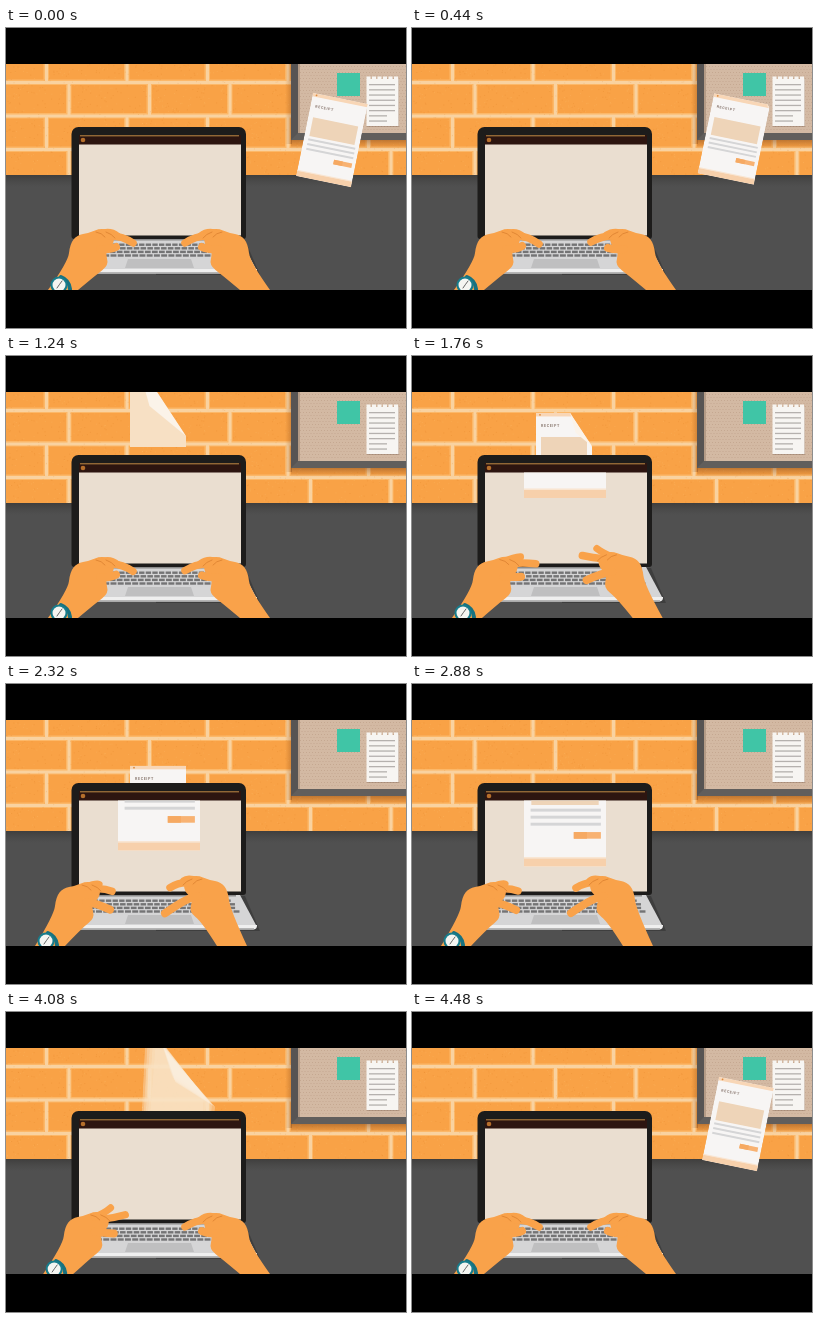
Animation, 400 px wide and 300 px high, one loop 4520 ms. Source, as an HTML page with a canvas:

```html
<!DOCTYPE html>
<html lang="en">
<head>
<meta charset="utf-8">
<title>Receipt to laptop</title>
<style>
html, body { margin: 0; width: 100%; height: 100%; overflow: hidden; background: #000; }
canvas { display: block; width: 400px; height: 300px; }
</style>
</head>
<body>
<canvas id="stage" width="400" height="300"></canvas>
<script>
const LOOP = 4520;
const PAPER_W = 56, PAPER_H = 85;
const MIRROR = 306;
const SKIN = '#f9a24a', CREASE = '#de8433';
const ctx = document.getElementById('stage').getContext('2d');

const REST = { arm: 57, palm: [86, 222], index: [127, 215], thumb: [110, 219] };
const LEFT_TYPE = { arm: 44, palm: [72, 219], index: [106, 207], thumb: [104, 226] };
const RIGHT_TYPE = { arm: 80, palm: [106, 213], index: [142, 204], thumb: [147, 229] };

const clamp = v => Math.min(1, Math.max(0, v));
const lerp = (a, b, u) => a + (b - a) * u;
const mix = (a, b, u) => [lerp(a[0], b[0], u), lerp(a[1], b[1], u)];

function ease(t, from, to) {
  const u = clamp((t - from) / (to - from));
  return u * u * (3 - 2 * u);
}

function random(seed) {
  return () => (seed = seed * 16807 % 2147483647) / 2147483647;
}

function box(c, x, y, w, h, fill) {
  c.fillStyle = fill;
  c.fillRect(x, y, w, h);
}

function roundBox(c, x, y, w, h, r, fill) {
  c.fillStyle = fill;
  c.beginPath();
  c.roundRect(x, y, w, h, r);
  c.fill();
}

function poly(c, fill, ...pts) {
  c.fillStyle = fill;
  c.beginPath();
  pts.forEach(p => c.lineTo(...p));
  c.closePath();
  c.fill();
}

function disc(c, x, y, r, fill) {
  c.fillStyle = fill;
  c.beginPath();
  c.arc(x, y, r, 0, 7);
  c.fill();
}

function line(color, width, a, bend, b) {
  ctx.strokeStyle = color;
  ctx.lineWidth = width;
  ctx.beginPath();
  ctx.moveTo(...a);
  ctx.quadraticCurveTo(...bend, ...b);
  ctx.stroke();
}

function fade(c, x0, y0, x1, y1, from, to) {
  const g = c.createLinearGradient(x0, y0, x1, y1);
  g.addColorStop(0, from);
  g.addColorStop(1, to);
  return g;
}

function layer(paint) {
  const el = document.createElement('canvas');
  el.width = 400;
  el.height = 300;
  paint(el.getContext('2d'));
  return el;
}

function paintWall(c) {
  const pitch = 80.5, rowStep = 33.5;
  box(c, 0, 36, 400, 111, '#f9d2a0');
  for (let row = 0; row < 4; row++) {
    const top = 22.5 + row * rowStep, h = rowStep - 3;
    const shift = row % 2 ? 63 : 40.5;
    for (let x = shift - pitch; x < 400; x += pitch) {
      box(c, x + 1.5, top, pitch - 3, h, '#fcb869');
      box(c, x + 2.5, top + 1, pitch - 5.5, h - 2.5, '#f9a246');
    }
  }
  const rnd = random(71);
  for (let i = 0; i < 1400; i++) {
    const fill = rnd() > .5 ? 'rgba(255,205,130,.2)' : 'rgba(205,105,20,.14)';
    box(c, rnd() * 400, 36 + rnd() * 110, 1, 1, fill);
  }
  box(c, 0, 0, 400, 36, '#000');
}

function paintBoard(c) {
  box(c, 279, 36, 7, 80, fade(c, 279, 0, 286, 0, 'rgba(150,80,20,0)', 'rgba(120,65,25,.35)'));
  box(c, 285, 112, 115, 9, fade(c, 0, 112, 0, 121, 'rgba(120,65,25,.45)', 'rgba(150,80,20,0)'));
  box(c, 285, 36, 115, 76, '#575453');
  poly(c, '#615e5c', [285, 112], [292, 105], [400, 105], [400, 112]);
  box(c, 292, 36, 108, 69, '#d3b9a3');
  for (let y = 38; y < 104; y += 3) {
    for (let x = 294 + y % 2 * 1.5; x < 400; x += 3) box(c, x, y, 1, 1, 'rgba(160,125,100,.28)');
  }
  box(c, 292, 36, 2, 69, 'rgba(90,65,50,.25)');
  box(c, 331, 45, 23, 23, '#40c5a6');
  box(c, 361, 51, 32, 48, 'rgba(80,55,40,.25)');
  box(c, 360.5, 51, 32, 47, '#f7f5f2');
  for (let x = 360.5; x < 392; x += 5.5) box(c, x, 48.5, 4, 3, '#f7f5f2');
  for (let y = 56; y < 93; y += 5.2) box(c, 363, y, y > 86 ? 18 : 26, 1.3, '#b5b1ae');
}

function paintDesk(c) {
  box(c, 0, 147, 400, 115, '#505050');
  box(c, 0, 147, 400, 12, fade(c, 0, 147, 0, 159, '#3f3e3d', 'rgba(70,70,70,0)'));
  box(c, 0, 262, 400, 38, '#000');
}

function paintLaptop(c) {
  poly(c, 'rgba(25,25,25,.3)', [150, 212], [239, 212], [254, 247], [150, 247]);
  roundBox(c, 65.5, 99, 174.5, 112, [7, 7, 3, 3], '#1d1c1b');
  box(c, 73, 107, 162, 100.5, '#eaded0');
  box(c, 73, 107, 162, 9.5, '#2d1510');
  box(c, 74, 107.3, 159, 1, '#bd8b47');
  disc(c, 77, 112, 2.3, '#b56f2c');

  poly(c, '#d5d5d6', [72, 211], [234, 211], [250, 241], [58, 241]);
  box(c, 76, 211, 154, 1.5, '#8b8b8b');
  roundBox(c, 57, 241, 194, 4.5, [0, 0, 4, 4], '#efefef');
  box(c, 60, 244, 188, 1.5, '#b5b5b5');
  for (let row = 0; row < 4; row++) {
    const y = 215.5 + row * 3.6, half = 73 + row * 2.2, step = half * 2 / 22;
    for (let i = 0; i < 22; i++) {
      box(c, 153 - half + (i + row % 2 * .3) * step, y, step - 1.3, 2.4, '#747475');
    }
  }
  poly(c, '#bfbfc0', [122, 231], [185, 231], [188, 240], [119, 240]);
}

const backdrop = layer(c => [paintWall, paintBoard, paintDesk].forEach(paint => paint(c)));
const laptop = layer(paintLaptop);

function receipt() {
  box(ctx, 0, 0, PAPER_W, PAPER_H, '#f7f5f4');
  box(ctx, 0, 0, PAPER_W, 3.5, '#f8d6b6');
  disc(ctx, 4, 1.8, .9, '#dc8a3e');
  ctx.fillStyle = '#8b7a72';
  ctx.font = 'bold 3.7px Roboto, Arial, sans-serif';
  ctx.letterSpacing = '.6px';
  ctx.fillText('RECEIPT', 5, 14);
  box(ctx, 5, 24, 46, 19, '#eed4b8');
  for (let y = 45.5; y < 57; y += 4.8) box(ctx, 4.5, y, 48, 2, '#d5d5d6');
  box(ctx, 34, 61.5, 18.5, 4.5, '#f8b272');
  box(ctx, 34, 61.5, 9, 4.5, '#f6a962');
  box(ctx, 0, 78.5, PAPER_W, 1, '#f9e6d3');
  box(ctx, 0, 79.5, PAPER_W, 5.5, '#f7d0ab');
}

// Lower edge of the receipt while it slides through the laptop.
function slide(t) {
  const drop = 76 * (1 - Math.exp(-Math.max(0, t - 1440) / 288));
  const settle = 16 * ease(t, 2100, 2880);
  const lift = 82 * clamp((t - 3560) / 480) ** 3;
  return 91 + drop + settle - lift;
}

// 0 on the board, 1 above the laptop.
const flight = t => ease(t, 360, 1240) - ease(t, 3980, 4440);

function sheet(t, alpha) {
  const p = flight(t), arc = Math.sin(Math.PI * p), s = slide(t);
  const dockY = s - PAPER_H / 2 + Math.max(0, s - 166) * .6;
  const flat = ease(t, 900, 2400) - ease(t, 3880, 4160);
  const fold = clamp(p * 2) * (1 - flat);
  const fx = PAPER_W * (1 - fold), fy = PAPER_H * fold;

  ctx.save();
  ctx.globalAlpha = alpha;
  ctx.translate(lerp(326, 152, p), lerp(112, dockY, p) + arc * 7);
  ctx.rotate(.2 * (1 - p) + .1 * arc);
  ctx.scale(1 + .32 * arc, 1 - .56 * arc);
  ctx.translate(-PAPER_W / 2, -PAPER_H / 2);
  ctx.beginPath();
  [[0, 0], [fx, 0], [PAPER_W, fy], [PAPER_W, PAPER_H], [0, PAPER_H]].forEach(pt => ctx.lineTo(...pt));
  ctx.clip();
  if (fold > .7) box(ctx, 0, 0, PAPER_W, PAPER_H, '#f7e0c4');
  else receipt();
  if (fold > .02) {
    const curl = [(fx + PAPER_W) / 2 - 14 * fold, fy / 2 + 8 * fold];
    poly(ctx, '#fbf3e9', [fx, 0], [PAPER_W, fy], curl);
  }
  ctx.restore();
}

function drawPaper(t) {
  const p = flight(t);
  if (p < .05 || p > .95) return sheet(t, 1);
  for (let i = -2; i <= 2; i++) sheet(t + i * 7, .4);
}

function drawScreen(t) {
  const k = 82 / PAPER_W;
  ctx.save();
  ctx.beginPath();
  ctx.rect(73, 116.5, 162, 91);
  ctx.clip();
  ctx.translate(112, slide(t) - PAPER_H * k);
  ctx.scale(k, k);
  receipt();
  ctx.restore();
}

function palmShape(arm, x, y) {
  const pts = [
    [arm - 15, 262], [x - 24, y + 12], [x - 22, y - 6], [x - 15, y - 15], [x - 3, y - 17], [x + 9, y - 22],
    [x + 22, y - 18], [x + 22, y - 6], [x + 13, y + 2], [x + 17, y + 15], [x + 4, y + 25], [arm + 15, 262]
  ];
  const last = pts.length - 1;
  ctx.beginPath();
  ctx.moveTo(...pts[0]);
  for (let i = 1; i < last; i++) {
    const end = i === last - 1 ? pts[last] : mix(pts[i], pts[i + 1], .5);
    ctx.quadraticCurveTo(...pts[i], ...end);
  }
  ctx.fillStyle = SKIN;
  ctx.fill();
}

// Draws a left hand; u moves it from rest to the typing pose.
function hand(type, u, tap) {
  const raise = Math.max(0, 40 * u * (1 - u));
  const arm = lerp(REST.arm, type.arm, u);
  const [x, y] = mix(REST.palm, type.palm, u);
  const [ix, iy] = mix(REST.index, type.index, u);
  const [tx, ty] = mix(REST.thumb, type.thumb, u);
  const tip = [ix, iy - raise + tap];
  const knuckle = [x + 17, y - 14];

  palmShape(arm, x, y);
  line(SKIN, 8, [x + 8, y - 1], [x + 18, y], [tx, ty - tap]);
  line(SKIN, 7, [x + 8, y - 16], [x + 18, y - 20], [lerp(x, ix, .62), tip[1] - 7]);
  line(SKIN, 7.5, knuckle, [lerp(x + 17, ix, .5), y - 15], tip);
  line(CREASE, .9, [x + 4, y - 18], [x + 10, y - 17], [x + 13, y - 13]);
  line(CREASE, .9, [x + 14, y - 18], [x + 20, y - 16], [x + 23, y - 12]);
  return arm;
}

function watch(x) {
  line('#18717f', 4, [x + 2, 249], [x + 10, 252], [x + 11, 261]);
  disc(ctx, x, 257, 8.5, '#187c8b');
  disc(ctx, x, 257, 6.5, '#f5f5f1');
  line('#555', .9, [x + 3, 253], [x, 257], [x - 2, 260]);
}

function drawHands(t) {
  const left = ease(t, 1600, 2240) - ease(t, 3740, 4320);
  const right = ease(t, 1340, 2100) - ease(t, 3360, 3880);
  const active = ease(t, 0, 240) - ease(t, 3600, 4200);
  const tap = Math.sin(t / 360 * Math.PI * 2) * active;
  ctx.lineCap = 'round';
  watch(hand(LEFT_TYPE, left, tap) - 4);
  ctx.save();
  ctx.translate(MIRROR, 0);
  ctx.scale(-1, 1);
  hand(RIGHT_TYPE, right, -tap);
  ctx.restore();
}

function draw(t) {
  ctx.drawImage(backdrop, 0, 0);
  ctx.save();
  ctx.beginPath();
  ctx.rect(0, 36, 400, 226);
  ctx.clip();
  drawPaper(t);
  ctx.drawImage(laptop, 0, 0);
  drawScreen(t);
  drawHands(t);
  ctx.restore();
}

const start = performance.now();
function tick() {
  const t = (performance.now() - start) % LOOP;
  draw(Math.floor(t / 40) * 40);
  requestAnimationFrame(tick);
}
tick();
</script>
</body>
</html>
```
